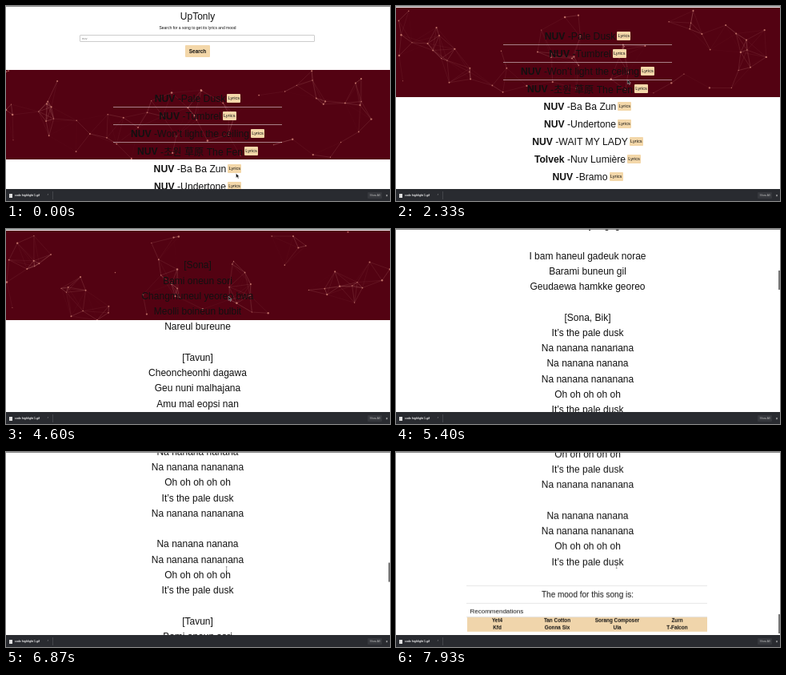
An HTML page with a canvas that plays this animation: 480 by 244 pixels, repeating every 8000 ms.

```html
<!DOCTYPE html>
<html lang="en">
<head>
<meta charset="utf-8">
<title>Lyrics finder</title>
<style>
  html, body { margin: 0; width: 100%; height: 100%; overflow: hidden; background: #fff; }
  body { position: relative; color: #111; font: 12px "Liberation Sans", Arial, sans-serif; }
  #view { position: absolute; left: 0; top: 0; width: 480px; height: 244px; overflow: hidden; }
  #view div, #view canvas, #view svg { position: absolute; box-sizing: border-box; }
  #page { left: 0; top: 0; width: 480px; height: 2187px; will-change: transform; }
  .mid { left: 0; width: 479px; text-align: center; white-space: pre; }
  #net { left: 0; top: 80px; }
  #field { left: 92px; top: 36px; width: 294px; height: 9px; padding-left: 2px; border: 1px solid #ccc;
    border-radius: 1px; color: #777; font-size: 4px; line-height: 7px; }
  #go { left: 224px; top: 49px; width: 31px; height: 15px; border-radius: 1px; background: #f3d7a9;
    font: bold 6.4px/15px "Liberation Sans", Arial, sans-serif; text-align: center; }
  #list { left: 134px; top: 105px; width: 211px; }
  #list div { left: 0; width: 211px; height: 22px; display: flex; align-items: center; justify-content: center;
    white-space: pre; font-size: 12.2px; border-bottom: 1px solid rgba(255, 255, 255, .5); }
  #list i { width: 17px; height: 11px; margin-left: 2px; border-radius: 1px; background: #f3d7a9;
    font: 5.7px/11px "Liberation Sans", Arial, sans-serif; text-align: center; flex: none; }
  #list span { font-family: "Liberation Sans", "Noto Sans CJK KR", sans-serif; }
  #song { top: 114.4px; line-height: 19.25px; }
  #foot { left: 88px; top: 2097px; width: 301px; height: 60px; border-top: 1px solid #e6e6e6; }
  #mood { left: 0; top: 0; width: 303px; font-size: 10px; line-height: 22px; text-align: center; }
  #rec { left: 0; top: 21px; width: 301px; height: 18px; padding-left: 4.5px; border: solid #e6e6e6; border-width: 1px 0;
    font-size: 8px; line-height: 20px; }
  #table { left: 1px; top: 39px; width: 300px; height: 18px; display: grid; grid-template-columns: repeat(4, 75px);
    background: #f0d5ab; font: bold 6.4px/8.7px "Liberation Sans", Arial, sans-serif; text-align: center; }
  #thumb { left: 478px; top: 0; width: 2px; height: 24px; background: #777; }
  #edge { left: 0; top: 0; width: 480px; height: 1px; background: #888; }
  #bar { left: 0; top: 229px; width: 480px; height: 15px; background: #292b30; color: #eee; font-size: 3.4px; line-height: 16px; }
  #bar div { top: 0; }
  #bar .icon { left: 4px; top: 5.5px; width: 3.5px; height: 5px; background: #ddd; }
  #bar .sep { left: 58px; top: 3px; width: 1px; height: 10px; background: #44464b; }
  #bar .all { left: 452px; top: 4px; width: 18px; height: 8px; line-height: 8px; background: #36383d;
    border-radius: 1px; text-align: center; color: #bbb; }
</style>
</head>
<body>
<div id="view">
  <div id="page">
    <div class="mid" style="top:6px;line-height:14px">UpTonly</div>
    <div class="mid" style="top:23px;font-size:5px;line-height:8px">Search for a song to get its lyrics and mood</div>
    <div id="field">nuv</div>
    <div id="go">Search</div>
    <canvas id="net" width="480" height="112"></canvas>
    <div id="list"></div>
    <div id="song" class="mid"></div>
    <div id="foot">
      <div id="mood">The mood for this song is:</div>
      <div id="rec">Recommendations</div>
      <div id="table"></div>
    </div>
  </div>
  <div id="thumb"></div>
  <div id="edge"></div>
  <svg id="arrow" width="6" height="8"><path d="M.5 .5V6L2 4.8 3 7 4 6.5 3 4.5H4.8Z" fill="#111" stroke="#fff" stroke-width=".4"/></svg>
  <svg id="beam" width="4" height="7"><path d="M.8 .7H2.6M1.7 .7V5.5M.8 5.5H2.6" stroke="#555" stroke-width=".5"/></svg>
  <div id="bar">
    <div class="icon"></div>
    <div style="left:11px;font-weight:bold">code highlight 1.gif</div>
    <div style="left:51px">⌃</div>
    <div class="sep"></div>
    <div class="all">Show All</div>
    <div style="left:474.5px;font-size:5px">×</div>
  </div>
</div>
<script>
const $ = id => document.getElementById(id);
const LOOP = 8000, STEP = 200 / 3, CLICK = 4330, PAGE = 2187, VIEW = 230;

const titles = ["Pale Dusk", "Tumbrel", "Won’t light the ceiling", "초원 草原 The Fen", "Ba Ba Zun",
  "Undertone", "WAIT MY LADY", "Nuv Lumière", "Bramo"];
$("list").innerHTML = titles.map((name, i) =>
  `<div style="top:${22 * i}px"><b>${i == 7 ? "Tolvek" : "NUV"} </b><span>-${name}</span><i>Lyrics</i></div>`).join("");

const chorus = `It’s the pale dusk
Na nanana nananana
Na nanana nanana
Na nanana nananana
Oh oh oh oh oh
It’s the pale dusk
Na nanana nananana

Na nanana nanana
Na nanana nananana
Oh oh oh oh oh
It’s the pale dusk`;

$("song").textContent = `[Sona]
Bami oneun sori
Changmuneul yeoreo bwa
Meolli boineun bulbit
Nareul bureune

[Tavun]
Cheoncheonhi dagawa
Geu nuni malhajana
Amu mal eopsi nan
Gidarigo isseo
Stay with me now

[Manideol]
Saebyeogi olttaekkaji
Uri duri nanun
Jageun iyagi
Haneure bichwo
Byeoldeuri naeryeowa
Gureumi jinagago

I bam haneul gadeuk norae
Barami buneun gil
Geudaewa hamkke georeo

[Sona, Bik]
${chorus}

[Homakyun]
Cheoncheonhi dagawa
Geu nuni malhajana
Saebyeogi olttaekkaji
Gidarigo isseo

[ T.U]
Haru deo meoreojyeo slow down
Neon sarajineun geurimja dwie
Gipeun tadeun mareum Where is home?
Yeah yeah yeah yeah

[ Manideol, Tavun, Both]
Soneul naemireo jabgo
Amureon dallyeobwado dasi jejarie doraon dream
Too far meolli naneun saereul bogo
Ijeobeorin geunal bami confession
Oneul dasi bulleo noraehaja uri


[Sona, Bik]
${chorus}

[Tavun]
Bami oneun sori
Meolli boineun bulbit
Haneure bichwo
Eodumeul jinagaseo gaja


[Homakyun/Tavun, Manideol/Tavun]
Gaseumi da
Meonji gadeukhan georiwa
Kyeoure nan
Hayan jongie yaksogeul jeogeoga
Sarajil geotman
Nae du son kkeuteul jabajwo
Yeah


${chorus}`;

$("table").innerHTML = ["Yet4", "Tan Cotton", "Sorang Composer", "Zurn", "Kfd", "Gonna Six", "Ula", "T-Falcon"]
  .map(name => `<span>${name}</span>`).join("");

// Keys are [time, ...values], joined linearly
const scrollKeys = [[1867, 0], [1933, 10], [2267, 78], [4800, 78], [5400, 494], [6267, 990.5], [7400, 1607.6], [7933, 1930.2]];
const mouseKeys = [[530, 287, 209], [1300, 290, 82], [2200, 290, 100], [3200, 280, 37], [4400, 280, 37],
  [4860, 274, 144], [6267, 274, 145], [7400, 274, 141], [7933, 274, 140]];

function at(keys, t) {
  const n = keys.findIndex(k => k[0] > t);
  if (n < 1) return keys[n ? keys.length - 1 : 0].slice(1);
  const a = keys[n - 1], b = keys[n], u = (t - a[0]) / (b[0] - a[0]);
  return a.slice(1).map((v, i) => v + (b[i + 1] - v) * u);
}

let seed = 11;
const rand = () => (seed = seed * 16807 % 2147483647) / 2147483647;
const dots = Array.from({ length: 62 }, () => ({
  x: rand() * 480, y: rand() * 112, vx: (rand() - .5) * .018, vy: (rand() - .5) * .018, r: .5 + rand() * .8
}));
const bounce = (v, max) => {
  v = ((v % (2 * max)) + 2 * max) % (2 * max);
  return v > max ? 2 * max - v : v;
};
const net = $("net").getContext("2d");

function drawNet(t) {
  // The net stands still for 400 ms
  const time = t < 530 ? Math.min(t, 130) : t - 400;
  const pts = dots.map(d => [bounce(d.x + d.vx * time, 480), bounce(d.y + d.vy * time, 112), d.r]);
  net.fillStyle = "#530212";
  net.fillRect(0, 0, 480, 112);
  net.lineWidth = .6;
  pts.forEach(([x, y, r], i) => {
    for (const [px, py] of pts.slice(i + 1)) {
      const far = Math.hypot(px - x, py - y) / 42;
      if (far > 1) continue;
      net.strokeStyle = `rgba(225,165,155,${.5 * (1 - far)})`;
      net.beginPath();
      net.moveTo(x, y);
      net.lineTo(px, py);
      net.stroke();
    }
    net.fillStyle = "rgba(220,140,125,.75)";
    net.beginPath();
    net.arc(x, y, r, 0, 7);
    net.fill();
  });
}

const show = (id, on) => $(id).style.display = on ? "" : "none";
const move = (id, x, y) => $(id).style.transform = `translate(${x}px,${y}px)`;

function frame() {
  const t = Math.floor(performance.now() % LOOP / STEP + .06) * STEP;
  const [top] = at(scrollKeys, t), [x, y] = at(mouseKeys, t), reading = t >= CLICK;
  move("page", 0, -top);
  move("thumb", 0, top / PAGE * VIEW);
  move("arrow", x, y);
  move("beam", x, y);
  show("list", !reading);
  show("song", reading);
  show("foot", reading);
  show("thumb", top > 78);
  show("arrow", t < 4860);
  show("beam", t >= 4860);
  if (top < 192) drawNet(t);
  requestAnimationFrame(frame);
}
frame();
</script>
</body>
</html>
```
